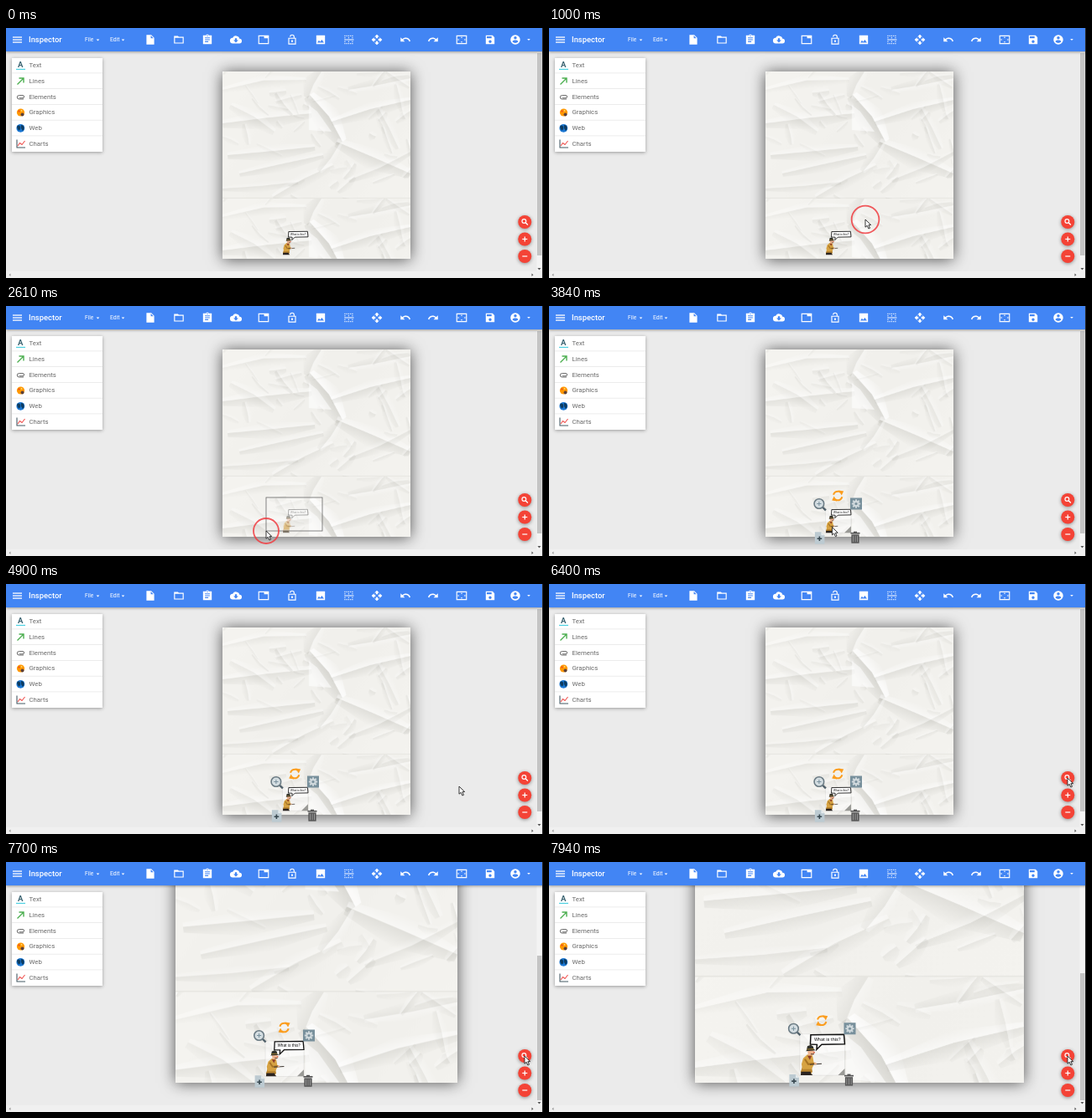
An HTML page with a canvas for the animation above (8 s loop, 640x299 px).

```html
<!DOCTYPE html>
<html lang="en">
<head>
<meta charset="utf-8">
<title>Inspector</title>
<style>
html, body { margin: 0; width: 100%; height: 100%; overflow: hidden; background: #ebebeb; }
canvas { display: block; width: 640px; height: 299px; }
</style>
</head>
<body>
<canvas id="stage"></canvas>
<script>
const LOOP = 8000, W = 640, H = 299;
const canvas = document.getElementById('stage');
const dpr = Math.max(1, window.devicePixelRatio || 1);
canvas.width = W * dpr;
canvas.height = H * dpr;
let g = canvas.getContext('2d');

// ---------- helpers ----------
const mix = (a, b, u) => a + (b - a) * u;
// index of the current step when n steps run evenly from a to b
const stepAt = (t, a, b, n) =>
  Math.max(0, Math.min(n - 1, Math.floor((t - a + 2) / ((b - a) / (n - 1)))));

function rect(x, y, w, h, fill) {
  g.fillStyle = fill;
  g.fillRect(x, y, w, h);
}
function disc(x, y, r, fill) {
  g.fillStyle = fill;
  g.beginPath();
  g.arc(x, y, r, 0, 7);
  g.fill();
}
function ring(x, y, r, color, width) {
  g.strokeStyle = color;
  g.lineWidth = width;
  g.beginPath();
  g.arc(x, y, r, 0, 7);
  g.stroke();
}
function fillPath(d, color) {
  g.fillStyle = color;
  g.fill(new Path2D(d), 'evenodd');
}
function linePath(d, color, width) {
  g.strokeStyle = color;
  g.lineWidth = width;
  g.stroke(new Path2D(d));
}
function at(x, y, k, draw) {
  g.save();
  g.translate(x, y);
  g.scale(k, k);
  draw();
  g.restore();
}
function label(s, x, y, size, color, weight = 400) {
  g.font = `${weight} ${size}px Roboto, sans-serif`;
  g.textBaseline = 'alphabetic';
  g.fillStyle = color;
  g.fillText(s, x, y);
}
function shadow(blur, color, dy = 0) {
  g.shadowBlur = blur * dpr;
  g.shadowColor = color;
  g.shadowOffsetY = dy * dpr;
}

// ---------- crumpled paper ----------
const PAGE = 224, TILE = 152;

function makePaper() {
  const k = 3, c = document.createElement('canvas');
  c.width = PAGE * k;
  c.height = PAGE * k;
  const p = c.getContext('2d');
  let seed = 11;
  const rnd = () => (seed = (seed * 16807) % 2147483647) / 2147483647;

  // a fold: shade fading out on one side, light on the other
  function fold(x1, y1, x2, y2, w, a) {
    const dx = x2 - x1, dy = y2 - y1, len = Math.hypot(dx, dy) || 1;
    const nx = -dy / len, ny = dx / len;
    const j = (rnd() - .5) * len * .12;
    const mx = (x1 + x2) / 2 + nx * j, my = (y1 + y2) / 2 + ny * j;
    for (const side of [1, -.7]) {
      const tone = side > 0 ? '122,122,112' : '255,255,255';
      const s = side > 0 ? a : a * 3.2;
      const ox = nx * w * side, oy = ny * w * side;
      const gr = p.createLinearGradient(mx, my, mx + ox, my + oy);
      gr.addColorStop(0, `rgba(${tone},${s})`);
      gr.addColorStop(1, `rgba(${tone},0)`);
      p.fillStyle = gr;
      p.beginPath();
      p.moveTo(x1, y1);
      p.lineTo(mx, my);
      p.lineTo(x2, y2);
      p.lineTo(x2 + ox * .4, y2 + oy * .4);
      p.lineTo(mx + ox, my + oy);
      p.lineTo(x1 + ox * .4, y1 + oy * .4);
      p.fill();
    }
  }
  const folds = [
    [104, 28, 143, 84, 20, .22], [0, 62, 106, 50, 14, .13],
    [130, 60, 224, 34, 12, .15], [0, 22, 100, 10, 10, .11],
    [118, 0, 102, 32, 14, .1], [224, 8, 150, 22, 9, .1],
    [6, 100, 110, 90, 12, .13], [136, 84, 224, 122, 16, .15],
    [20, 122, 120, 100, 10, .12], [60, 150, 132, 112, 11, .11],
    [140, 86, 116, 120, 10, .1], [150, 130, 224, 96, 9, .1],
    [10, 40, 62, 72, 12, .09], [186, 44, 210, 92, 10, .09],
    [0, 140, 90, 132, 8, .1]
  ];
  for (let y = 0; y < PAGE; y += TILE) {
    seed = 11;
    p.setTransform(k, 0, 0, k, 0, y * k);
    p.save();
    p.beginPath();
    p.rect(0, 0, PAGE, TILE);
    p.clip();
    const base = p.createLinearGradient(0, 0, PAGE, TILE);
    base.addColorStop(0, '#f5f4f0');
    base.addColorStop(.5, '#f1f0ec');
    base.addColorStop(1, '#f4f3ef');
    p.fillStyle = base;
    p.fillRect(0, 0, PAGE, TILE);
    for (const f of folds) fold(...f);
    for (let i = 0; i < 46; i++) {
      const x = rnd() * PAGE, v = rnd() * TILE, ang = rnd() * 2.4 - 1, l = 8 + rnd() * 26;
      fold(x, v, x + Math.cos(ang) * l, v + Math.sin(ang) * l, 3 + rnd() * 6, .05 + rnd() * .06);
    }
    p.fillStyle = 'rgba(255,255,255,.6)';
    p.fill(new Path2D('M103 40L113 48L130 72L103 70z'));
    p.fillStyle = 'rgba(140,140,130,.12)';
    p.fillRect(0, TILE - 1, PAGE, 1);
    p.restore();
  }
  return c;
}
const paper = makePaper();

// ---------- toolbar ----------
const tools = [
  [172, 'M5 2h9l6 6v14H4V2zM13 3.5V9h5.5z'],
  [206, 'M2 4h8l2 2h10v14H2zM4 8v10h16V8z'],
  [240, 'M3 3h6l1-2h4l1 2h6v18H3zM7 7v2h10V7zM7 11v2h10v-2zM7 15v2h7v-2zM11 3v2h2V3z'],
  [274, 'M6 20a6 6 0 0 1-.6-12a7.5 7.5 0 0 1 14 2A5 5 0 0 1 19 20zM17 13h-3V9h-4v4H7l5 5z'],
  [307, 'M1 3h22v18H1zM3 5v14h18V9h-8V5z'],
  [341, 'M4 8h11V6a3 3 0 0 0-6 0H7a5 5 0 0 1 10 0v2h3v14H4zM6 10v10h12V10zM10 15a2 2 0 1 0 4 0a2 2 0 1 0-4 0z'],
  [375, 'M3 3h18v18H3zM8.5 13.5L5 18h14l-4.500-6L11 16.500z'],
  [442, 'M10 9h4V6h3l-5-5-5 5h3zM9 10H6V7l-5 5 5 5v-3h3zM23 12l-5-5v3h-3v4h3v3zM14 15h-4v3H7l5 5 5-5h-3z'],
  [476, 'M2 7l3.600 3.600C11 6 20 7 22.500 15.200L20 16C18 10 11.500 9 7.400 12.400L11 16H2z'],
  [509, 'M22 7l-3.600 3.600C13 6 4 7 1.500 15.200L4 16C6 10 12.500 9 16.600 12.400L13 16H22z'],
  [543, 'M1 3h22v18H1zM3 5v14h18V5zM12 5.500L10 8h4zM18 10v4l2.500-2zM6 10l-2.500 2L6 14zM10 16h4l-2 2.500z'],
  [577, 'M3 3h14l4 4v14H3zM5 5v4h10V5zM9 16a3 3 0 1 0 6 0a3 3 0 1 0-6 0z'],
  [607, 'M2 12a10 10 0 1 0 20 0a10 10 0 1 0-20 0zM9 8a3 3 0 1 0 6 0a3 3 0 1 0-6 0zM6 16c0-4 12-4 12 0c-3 4-9 4-12 0z']
];

function caret(x, y) {
  fillPath(`M${x - 1.8} ${y}h3.600l-1.800 2z`, '#fff');
}
function toolbar() {
  g.save();
  shadow(3, 'rgba(0,0,0,.35)', 1);
  rect(0, 0, W, 28, '#4285f4');
  g.restore();
  for (let i = 0; i < 3; i++) rect(8, 10.4 + i * 3, 11, 1.3, '#fff');
  label('Inspector', 27, 17.3, 9.4, '#fff', 500);
  label('File', 94, 16.4, 6.5, '#fff');
  caret(109.5, 13.4);
  label('Edit', 124, 16.4, 6.8, '#fff');
  caret(139.5, 13.4);
  for (const [x, d] of tools) at(x - 6.9, 7.1, .575, () => fillPath(d, '#fff'));
  for (let r = 0; r < 5; r++)
    for (let c = 0; c < 5; c++)
      if (r === 2 || r % 2 === 0 || c % 2 === 0)
        rect(403.3 + c * 2.25, 8.8 + r * 2.3, r === 2 ? 2.1 : 1.2, 1.2, 'rgba(255,255,255,.9)');
  caret(623, 13);
}

// ---------- side panel ----------
const rowIcons = [
  () => {
    label('A', 14, 47.4, 9.5, '#37606e', 700);
    rect(12, 48.8, 11, 1.2, '#4dd0e1');
  },
  () => linePath('M13.500 67.500L21 60M15.500 60H21V65.500', '#4caf50', 1.4),
  () => linePath('M21 85H15.500a2.200 2.200 0 0 1 0-4.400H20a1.500 1.500 0 0 1 0 3.200H15.800', '#666', 1),
  () => {
    disc(17.5, 101, 4.6, '#ff9800');
    disc(19.5, 103.4, 2, '#5d4037');
    disc(15.5, 99.5, .9, '#e53935');
    disc(18.6, 98.8, .9, '#ffe082');
  },
  () => {
    disc(17.3, 119.8, 4.9, '#1976d2');
    fillPath('M13 118c3-4 5 1 4 3s-3 2-4-3zM18 116c4 0 4 4 3 6s-4-2-3-6z', '#0d3c61');
  },
  () => {
    linePath('M13 133.500V143H23', '#455a64', 1.1);
    linePath('M14 141L16.500 137.500L19 139.500L22.500 135', '#ef5350', 1.1);
  }
];
function panel() {
  g.save();
  shadow(4, 'rgba(0,0,0,.35)', 1);
  rect(7, 36, 108, 112, '#fff');
  g.restore();
  ['Text', 'Lines', 'Elements', 'Graphics', 'Web', 'Charts'].forEach((s, i) => {
    const y = 44.4 + i * 18.75;
    if (i) rect(7, y - 9.6, 108, .7, '#e4e4e4');
    label(s, 27.5, y + 2.6, 7.8, '#6a6a6a');
    rowIcons[i]();
  });
}

// ---------- detective and speech bubble (drawn at 1.75 zoom) ----------
function man() {
  fillPath('M1 45L5 33L13 33L15 45L13 48H2z', '#b9852f');
  fillPath('M1.500 45H13V47L15.500 49.300H1z', '#2a2320');
  fillPath('M4 29L9 24.500L15 25.500L17 36L14 42L3 42L2 36z', '#d6a242');
  fillPath('M9 26L14 26L12 31z', '#8c3b2a');
  linePath('M6 30L10 36L18 35', '#a87424', 2.2);
  linePath('M12 36.500L26 35.500', '#3a332e', 1.2);
  disc(18.5, 35.4, 1.4, '#eab08a');
  fillPath('M9 19H16L17.500 22L15.500 25.500H10z', '#eeb48f');
  disc(17, 22, 1.1, '#d9694f');
  fillPath('M8 19.500L9 14.500L13 13L16 15L16.500 18L19 19.500L7 20.500z', '#2f302a');
  linePath('M8.500 18.300L16.500 17.800', '#a5832f', 1);
  linePath('M13 24H17', '#3a2a20', .9);
}
function bubble() {
  const d = 'M13 1L52.500 .5L53.500 12L26 12.500L20 18.500L20.500 12.600L12.500 12.300z';
  fillPath(d, '#fff');
  linePath(d, '#111', 1.5);
  g.textAlign = 'center';
  label('What is this?', 32.8, 8.6, 5.6, '#111');
  g.textAlign = 'left';
}

// ---------- handles around the selected object ----------
function handles(L, T, R, B) {
  fillPath(`M${R} ${B - 8}V${B}H${R - 8}z`, '#9a9a96');

  const mx = L - 7.5, my = T - 6.5;
  linePath(`M${mx + 4} ${my + 4}l4 3.800`, '#50606a', 2.4);
  disc(mx, my, 5.8, '#d5dee2');
  ring(mx, my, 5.8, '#6b7b84', 1.6);
  linePath(`M${mx - 2.6} ${my}h5.200M${mx} ${my - 2.6}v5.200`, '#78909c', 1);

  g.save();
  g.translate((L + R) / 2 - .5, T - 16);
  for (let i = 0; i < 2; i++) {
    g.strokeStyle = '#fb9d1e';
    g.lineWidth = 2.1;
    g.beginPath();
    g.arc(0, 0, 5.3, -2.9, -.9);
    g.stroke();
    fillPath('M1 -6.500L7 -5.500L4.500 -.5z', '#fb9d1e');
    g.rotate(Math.PI);
  }
  g.restore();

  const sx = R + 6, sy = T - 6.5;
  rect(sx - 7, sy - 7, 14, 14, '#78909c');
  for (let i = 0; i < 8; i++) {
    g.save();
    g.translate(sx, sy);
    g.rotate(i * Math.PI / 4);
    rect(-1, -5.2, 2, 3, '#cfd8dc');
    g.restore();
  }
  disc(sx, sy, 3.7, '#cfd8dc');
  disc(sx, sy, 1.6, '#78909c');

  const ax = L - 7, ay = B + 6;
  fillPath(`M${ax - 5.5} ${ay - 7}h7.500l4 4v10.500h-11.500z`, '#bccad1');
  fillPath(`M${ax + 2} ${ay - 7}v4h4z`, '#e4ebee');
  linePath(`M${ax - 2.8} ${ay + 1}h5.600M${ax} ${ay - 1.8}v5.600`, '#37474f', 1.6);

  const tx = R + 5, ty = B + 5.5;
  rect(tx - 5.5, ty - 5.8, 11, 1.7, '#555');
  rect(tx - 2, ty - 7, 4, 1.4, '#555');
  rect(tx - 4.6, ty - 3.4, 9.2, 10.4, '#555');
  for (let i = -1; i < 2; i++) rect(tx + i * 2.6 - .4, ty - 2, .8, 7.6, '#aaa');
}

// ---------- scroll bars and round buttons ----------
function scrollBars(zoom) {
  rect(0, 291, W, 8, '#f0f0f0');
  rect(632.5, 29, 7, 262, '#f3f3f3');
  const [top, end] = { 1: [30, 272], 1.25: [83, 285], 1.5: [112, 285], 1.75: [133, 285] }[zoom];
  rect(633, top, 5.4, end - top, '#c4c4c4');
  fillPath('M633.500 287h4l-2 2.400z', '#555');
  fillPath('M5.500 293.400v3.600l-2-1.800z', '#999');
  fillPath('M626.500 293.400v3.600l2-1.800z', '#555');
  rect(639, 0, 1, H, '#2b2b2b');
}
function buttons() {
  for (let i = 0; i < 3; i++) {
    const y = 232 + i * 20.5;
    g.save();
    shadow(4, 'rgba(0,0,0,.4)', 1);
    disc(618.3, y, 8, '#f44336');
    g.restore();
    if (i) {
      rect(615.3, y - .6, 6, 1.2, '#fff');
      if (i === 1) rect(617.7, y - 3, 1.2, 6, '#fff');
    } else {
      ring(617.4, y - 1, 2.4, '#fff', 1.2);
      linePath(`M619.200 ${y + .8}l2.700 2.700`, '#fff', 1.4);
    }
  }
}

function pointer(x, y) {
  at(x, y, 1, () => {
    const d = 'M0 0V9.200L2.200 7.300L3.900 11L5.500 10.300L3.900 6.700L6.700 6.500z';
    fillPath(d, '#fff');
    linePath(d, '#222', .9);
  });
}

// ---------- timeline ----------
const FROM = [377, 229], DROP = [310, 269];

function pose(t) {
  if (t < 420) return {};
  if (t < 1590) {
    const k = stepAt(t, 420, 1450, 8);
    return { pos: FROM, r: mix(23, 7.5, k / 7) };
  }
  if (t < 3170) {
    const u = stepAt(t, 1590, 2610, 8) / 7, e = 1 - (1 - u) ** 1.6;
    return { pos: [mix(350.5, DROP[0], e), mix(246, DROP[1], e)], r: 15, lag: 2 * (1 - e), drag: true };
  }
  if (t < 3700) return { pos: DROP };
  if (t < 4900) {
    const u = (stepAt(t, 3700, 4740, 8) + 1) / 9;
    return { pos: [mix(310, 540, 1 - (1 - u) ** 1.08), mix(269, 242, 1 - (1 - u) ** 1.5)] };
  }
  if (t < 6060) {
    const u = stepAt(t, 4900, 5920, 8) / 7, e = 1 - (1 - u) ** 1.5;
    return { pos: [mix(540, 616.5, e), mix(242, 232.6, e)] };
  }
  const u = (stepAt(t, 6060, 6400, 3) + 1) / 3;
  return { pos: [mix(616.5, 618, u), mix(232.6, 232, u)] };
}

function draw(t) {
  const s = pose(t);
  const zoom = t < 7040 ? 1 : t < 7700 ? 1.25 : t < 7940 ? 1.5 : 1.75;
  const bottom = zoom === 1 ? 276 : 263.5;
  const px = x => 370 + (x - 370) * zoom, py = y => bottom + (y - 276) * zoom;
  const picked = t >= 3320;

  g.setTransform(dpr, 0, 0, dpr, 0, 0);
  rect(0, 0, W, H, '#ebebeb');

  const size = PAGE * zoom;
  g.save();
  shadow(17, 'rgba(0,0,0,.65)', 1);
  rect(px(258), py(52), size, size, '#f3f2ee');
  g.restore();
  g.imageSmoothingQuality = 'high';
  g.drawImage(paper, px(258), py(52), size, size);

  const L = px(329.4), T = py(243), R = px(360), B = py(271.2);
  if (picked) {
    rect(L, T, R - L, B - T, 'rgba(255,255,255,.5)');
    g.strokeStyle = 'rgba(150,150,150,.25)';
    g.lineWidth = .6;
    g.strokeRect(L, T, R - L, B - T);
  }
  at(L, T, zoom / 1.75, () => {
    g.globalAlpha = s.drag && s.pos[0] < 342 ? .5 : 1;
    man();
    g.globalAlpha = s.drag ? .5 : 1;
    bubble();
  });
  if (picked) handles(L, T, R, B);

  if (s.drag) {
    const x = s.pos[0] + s.lag, y = s.pos[1];
    g.lineWidth = .8;
    g.strokeStyle = '#666';
    g.fillStyle = 'rgba(255,255,255,.2)';
    g.fillRect(x, FROM[1], FROM[0] - x, y - FROM[1]);
    g.strokeRect(x, FROM[1], FROM[0] - x, y - FROM[1]);
  }

  scrollBars(zoom);
  panel();
  buttons();
  toolbar();
  rect(639, 0, 1, 28, '#2b2b2b');

  if (s.r) ring(s.pos[0] + (s.lag || 0), s.pos[1], s.r, 'rgba(240,60,65,.85)', 1.8);
  if (s.pos) pointer(...s.pos);
}

const start = performance.now();
function tick() {
  draw((performance.now() - start) % LOOP);
  requestAnimationFrame(tick);
}
tick();
</script>
</body>
</html>
```
